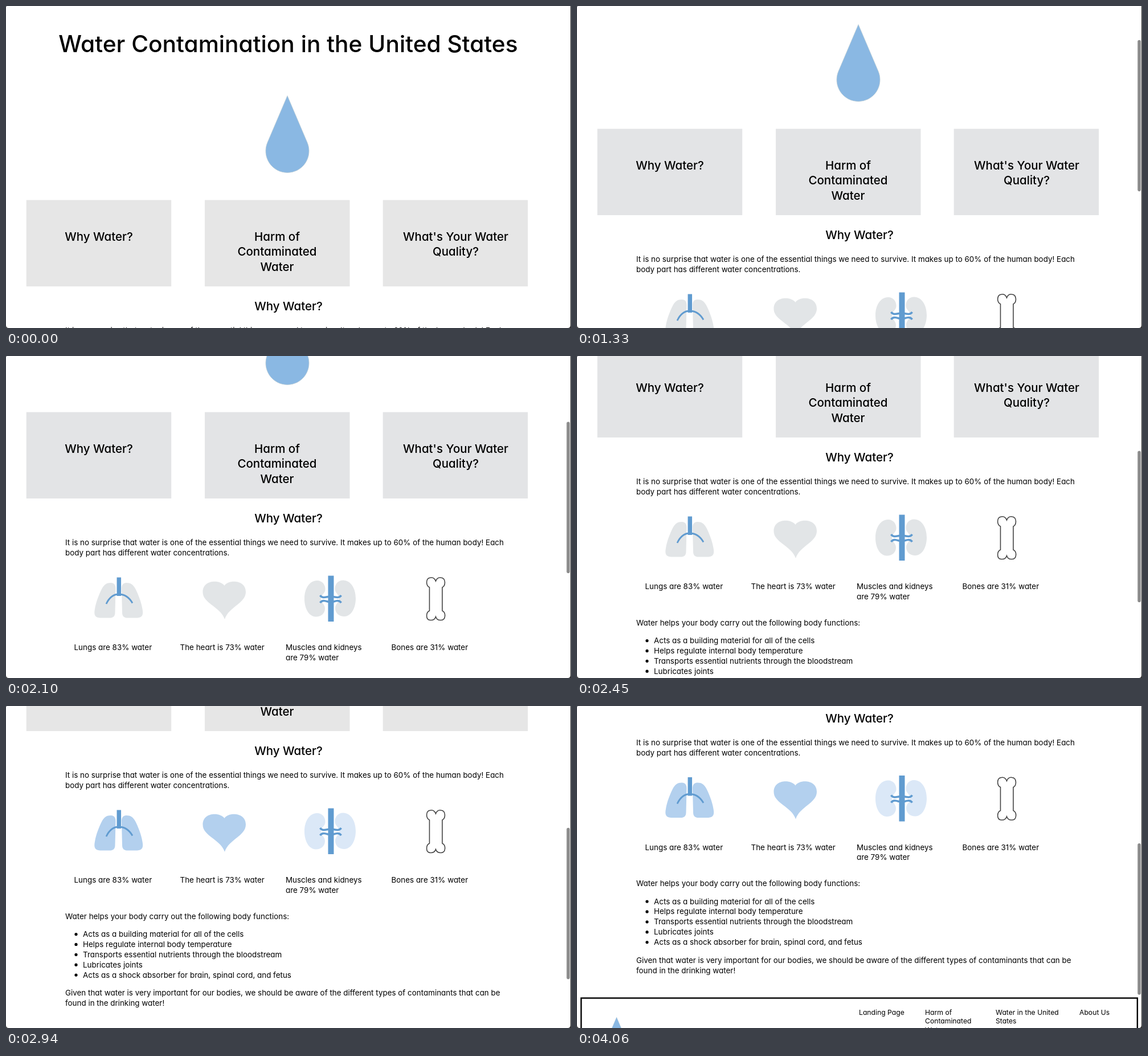
An HTML page for the animation above (4480 ms loop, 992 by 565 pixels).

```html
<!DOCTYPE html>
<html lang="en">
<head>
<meta charset="utf-8">
<title>Water Contamination</title>
<style>
  @property --s { syntax: "<number>"; inherits: true; initial-value: 0; }

  html, body { margin: 0; width: 100%; height: 100%; overflow: hidden; background: #fff; }
  svg {
    display: block; width: 992px; height: 565px;
    animation: scroll 4480ms steps(1) infinite;
  }
  text {
    font: 13.42px Inter, Lato, "Open Sans", sans-serif;
    font-feature-settings: "cv11";
    font-optical-sizing: none;
  }
  .title { font-size: 40.7px; font-weight: 500; }
  .head text { font-size: 20.5px; font-weight: 500; }
  .mid, .mid text { text-anchor: middle; }
  .nav text { font-size: 12.2px; }

  .page { transform: translateY(calc(var(--s) * -1px)); }
  .thumb { fill: #8d8d8d; opacity: var(--s); transform: translateY(calc(var(--s) * .477px)); }

  .box, .organ, .pale { animation: 4480ms step-end infinite; }
  .box { fill: #e6e6e6; animation-name: box; }
  .organ { fill: #b3d0ee; animation-name: organ; }
  .pale { fill: #dbe8f7; animation-name: pale; }
  .drop { fill: #8ab8e3; stroke: #bccdd6; stroke-width: .8; }
  .vein { fill: none; stroke: #609bd0; }
  .bone { fill: none; stroke: #444; stroke-width: 1.6; }

  /* scroll offset in px, moving once every 70 ms */
  @keyframes scroll {
    0% { --s: 0; }
    21.875% { --s: 0; animation-timing-function: steps(2); }
    25% { --s: 45; animation-timing-function: steps(2); }
    28.125% { --s: 107; animation-timing-function: steps(5); }
    35.9375% { --s: 197; animation-timing-function: steps(3); }
    40.625% { --s: 226; animation-timing-function: steps(4); }
    46.875% { --s: 242; animation-timing-function: steps(2); }
    50% { --s: 262; animation-timing-function: steps(3); }
    54.6875% { --s: 349; animation-timing-function: steps(2); }
    57.8125% { --s: 394; animation-timing-function: steps(3); }
    62.5% { --s: 433; animation-timing-function: steps(2); }
    65.625% { --s: 448; }
    67.1875% { --s: 451; }
    68.75% { --s: 451; animation-timing-function: steps(6); }
    78.125% { --s: 472; animation-timing-function: steps(6); }
    87.5% { --s: 502; }
    90.625%, 100% { --s: 505.5; }
  }
  @keyframes box { 26.5625% { fill: #e3e4e6; } 62.5% { fill: #e6e6e6; } }
  @keyframes organ { 26.5625% { fill: #e2e5e7; } 62.5% { fill: #b3d0ee; } }
  @keyframes pale { 26.5625% { fill: #e2e5e7; } 62.5% { fill: #dbe8f7; } }
</style>
</head>
<body>
<svg viewBox="0 0 992 565">
  <defs>
    <path id="drop" d="M0 0L35 82.1A38 38 0 1 1 -35 82.1Z"/>
    <path id="lung" d="M184 192C191 192 193 197 192.5 204L191.5 244C191.5 251 188 253.5 182 253.5L165 253.5C156 253 154 248 156 238C158 225 164 211 168 203C172 195 177 192 184 192Z"/>
    <path id="kidney" d="M546 188C556 188 561 196 560.5 204C560 211 553 213 553 220C553 227 560 229 560 237C560 246 553 251.5 544 251.5C531 251 524 236 524 220C524 202 533 188 546 188Z"/>
  </defs>

  <g class="page">
    <text class="title mid" x="495.5" y="81">Water Contamination in the United States</text>
    <use href="#drop" class="drop" transform="translate(494 157.5)"/>

    <g class="box">
      <rect x="35.7" y="340.5" width="254.5" height="151.5"/>
      <rect x="349" y="340.5" width="254.5" height="151.5"/>
      <rect x="661.7" y="340.5" width="254.5" height="151.5"/>
    </g>
    <g class="head mid">
      <text x="163" y="412">Why Water?</text>
      <text x="476" y="412">Harm of</text>
      <text x="476" y="438.3">Contaminated</text>
      <text x="476" y="464.6">Water</text>
      <text x="789.5" y="412">What's Your Water</text>
      <text x="789.5" y="438.3">Quality?</text>
      <text x="496" y="534.3">Why Water?</text>
    </g>

    <text x="104" y="574.3">It is no surprise that water is one of the essential things we need to survive. It makes up to 60% of the human body! Each</text>
    <text x="104" y="592.2">body part has different water concentrations.</text>

    <g transform="translate(0 448)">
      <g class="organ">
        <use href="#lung"/>
        <use href="#lung" transform="translate(395.5 0) scale(-1 1)"/>
        <path d="M383.5 197C390 186 421 186 421 208C421 228 391 234 384 256C377 234 345 228 345.5 208C345.5 186 376 186 383.5 197Z"/>
      </g>
      <g class="pale">
        <use href="#kidney"/>
        <use href="#kidney" transform="translate(1138 -.5) scale(-1 1)"/>
      </g>
      <g class="vein">
        <path stroke-width="7.5" d="M198.3 182.5V215"/>
        <path stroke-width="2.8" d="M176 229Q184 212 198 212Q213 212 222 227.5"/>
        <path stroke-width="10" d="M570.5 179.5V260"/>
        <path stroke-width="3.6" d="M551.5 214C555 219 560 217.5 565 216.5H575C580 217.5 585 219 588.5 214M551.5 227C555 222 560 223.5 565 225H575C580 223.5 585 222 588.5 227"/>
      </g>
      <path class="bone" d="M743.5 200C737 197 736.5 184 745 183C750 182 753 185 754.5 189C756 185 759 182 764 183C772.5 184 772 197 766 200V241C772.5 244 772.5 257 764 257.5C759 258 756 256 754.5 251.5C753 256 750 258 745 257.5C736.5 257 737 244 743.5 241Z"/>
    </g>

    <text x="119.5" y="758">Lungs are 83% water</text>
    <text x="305.5" y="758">The heart is 73% water</text>
    <text x="491" y="758">Muscles and kidneys</text>
    <text x="491" y="775.9">are 79% water</text>
    <text x="676.5" y="758">Bones are 31% water</text>

    <text x="104" y="821.5">Water helps your body carry out the following body functions:</text>
    <text x="135" y="853">Acts as a building material for all of the cells</text>
    <text x="135" y="870.9">Helps regulate internal body temperature</text>
    <text x="135" y="888.8">Transports essential nutrients through the bloodstream</text>
    <text x="135" y="906.6">Lubricates joints</text>
    <text x="135" y="924.5">Acts as a shock absorber for brain, spinal cord, and fetus</text>
    <path d="M123 848.6V921" fill="none" stroke="#000" stroke-width="5.2" stroke-linecap="round" stroke-dasharray="0 17.87"/>
    <text x="104" y="956.3">Given that water is very important for our bodies, we should be aware of the different types of contaminants that can be</text>
    <text x="104" y="974.2">found in the drinking water!</text>

    <rect x="7.3" y="1018" width="976.6" height="166" fill="none" stroke="#000" stroke-width="2.4"/>
    <use href="#drop" class="drop" transform="translate(69.5 1051.5) scale(.55)"/>
    <g class="nav">
      <text x="495" y="1047.3">Landing Page</text>
      <text x="611" y="1047.3">Harm of</text>
      <text x="611" y="1062.9">Contaminated</text>
      <text x="611" y="1078.4">Water</text>
      <text x="735" y="1047.3">Water in the United</text>
      <text x="735" y="1062.9">States</text>
      <text x="882" y="1047.3">About Us</text>
    </g>
  </g>

  <rect class="thumb" x="984.3" y="0" width="5.7" height="265.5" rx="2.8"/>
  <path fill="#333" fill-rule="evenodd" d="M0 0H992V565H0ZM2 0H991V560Q991 565 986 565H5Q0 565 0 560V2Q0 0 2 0Z"/>
</svg>
</body>
</html>
```
